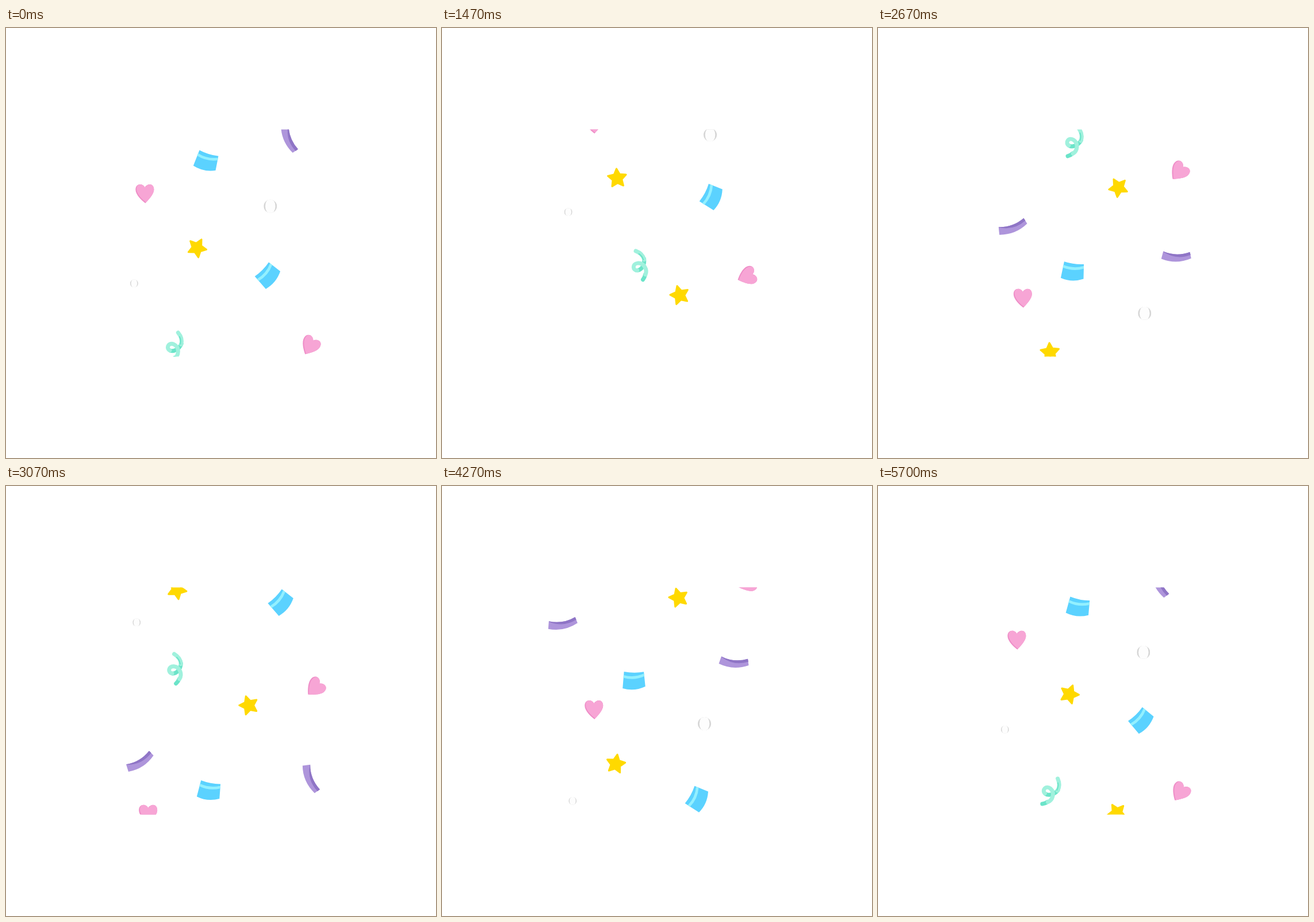
Write an HTML page with a canvas that moves like this. It is 748 px wide and 748 px high and loops after 5.73 s.

```html
<!DOCTYPE html>
<html lang="en">
<head>
<meta charset="utf-8">
<title>Falling confetti</title>
<style>
  html, body { margin: 0; width: 100%; height: 100%; overflow: hidden; background: #fff; }
  canvas { display: block; width: 748px; height: 748px; }
</style>
</head>
<body>
<canvas id="stage" width="748" height="748"></canvas>
<script>
const ctx = document.getElementById('stage').getContext('2d');
const LOOP = 5730, STEPS = 24;
const TOP = 176.5, SIZE = 395, MARGIN = 45;

function fill(path, color) {
  ctx.fillStyle = color;
  ctx.fill(new Path2D(path));
}

function stroke(path, color) {
  ctx.strokeStyle = color;
  ctx.stroke(new Path2D(path));
}

function heart() {
  const shape = new Path2D('M0-11C-3-18-16-19-16-7C-16 2-5 12 1 16.5C6 11 16 1 16-7C16-19 4-18 0-11Z');
  ctx.fillStyle = '#ee8dc7';
  ctx.fill(shape);
  ctx.clip(shape);
  ctx.translate(1.8, -1);
  ctx.fillStyle = '#f7a5d5';
  ctx.fill(shape);
}

function star() {
  ctx.beginPath();
  for (let i = 0; i < 10; i++) {
    const r = i % 2 ? 8.3 : 16.6, a = i * Math.PI / 5;
    ctx.lineTo(r * Math.cos(a), r * Math.sin(a));
  }
  ctx.closePath();
  ctx.fillStyle = ctx.strokeStyle = '#ffd900';
  ctx.lineWidth = 3;
  ctx.lineJoin = 'round';
  ctx.fill();
  ctx.stroke();
}

const ball = r => () => {
  ctx.beginPath();
  ctx.arc(0, 0, r, 0, 7);
  ctx.clip();
  ctx.fillStyle = '#d5d5d5';
  ctx.fillRect(-r, -r, 2 * r, 2 * r);
  ctx.beginPath();
  ctx.ellipse(0, 0, r * 0.77, r * 1.13, 0, 0, 7);
  ctx.fillStyle = '#fdfdfd';
  ctx.fill();
};

function patch() {
  fill('M-16.5-15Q1-11.5 18-14.5L20.5 11Q1 20-19 14Z', '#5bd2ff');
  fill('M-17.3-9Q1-4 18.3-11.5L18.8-6.8Q1 1-17.8-4.5Z', '#93f0ff');
}

function strip() {
  fill('M-26 7Q0 17.3 26 6L23.7-5Q0 3.5-22.6-6Z', '#ae95db');
  fill('M-22.6-6Q0 3.5 23.7-5L25 0Q0 9.5-22-5Z', '#8f75c6');
}

function curl() {
  const light = '#a0f1dd', dark = '#6be4c9';
  ctx.lineWidth = 7;
  ctx.lineCap = 'round';
  stroke('M9-10C9 0 3 8-4 8.5', dark);
  stroke('M8 17Q6.5 22 3 25.5', dark);
  stroke('M-4-25.5C3-22 8-17 9-9', light);
  stroke('M-5 8.5C-13 8-13-4-3-4C8-4 13 9 8.5 17', light);
  ctx.lineWidth = 2;
  stroke('M1-20Q6-16 7.5-9', dark);
}

// Motion rules: p counts steps, angles are in degrees
const fall = (enter, speed) => p => TOP + speed * (p - enter);
const line = (mid, at, rate) => p => mid + rate * (p - at);
const wave = (mid, amp, peak, period, drift = 0) => p =>
  mid + drift * (p - peak) + amp * Math.cos(2 * Math.PI * (p - peak) / period);
const still = () => 0;

// Each piece: shape, y, x, angle
const pieces = [
  [heart, fall(18.47, 20.2), wave(253, 12, 17.3, 12.4), still],
  [heart, fall(5.36, 20.2), wave(530, 7.5, 14.7, 13), wave(52, 19.5, 17.7, 13)],
  [star, fall(13.8, 20.2), wave(314, 19, 23.3, 16), wave(-5, 19, 25.4, 13)],
  [star, fall(4.14, 20.8), wave(417.5, 6, 12.5, 15), wave(32.5, 8.5, 16.3, 13)],
  [ball(11.5), fall(17.55, 20.7), wave(461.3, 5.6, 19, 17), still],
  [ball(7), fall(11.06, 20.7), wave(222.8, 5.2, 12.7, 15), still],
  [patch, fall(21.42, 21.3), wave(338.8, 9.4, 23.4, 14, 0.35), wave(7.5, 12, 25.2, 10.5)],
  [patch, fall(12.86, 22.8), line(455, 24, -2.27), wave(-54, 9, 13.2, 10)],
  [curl, fall(8.03, 23.7), wave(319.5, 27, 18.8, 11), wave(13, 34, 21.8, 11)],
  [strip, fall(23.37, 22.65), line(494.5, 24, 2.7), wave(28, 40, 23.9, 14.5)],
  [strip, fall(2.73, 26.7), wave(218.5, 24.5, 12, 15.5, -2), wave(-23.5, 20, 17.5, 11)]
];

function draw(step) {
  ctx.fillStyle = '#fff';
  ctx.fillRect(0, 0, 748, 748);
  ctx.save();
  ctx.beginPath();
  ctx.rect(TOP, TOP, SIZE, SIZE);
  ctx.clip();
  for (const [shape, y, x, angle] of pieces) {
    for (const p of [step, step + STEPS]) {
      if (y(p) < TOP - MARGIN || y(p) > TOP + SIZE + MARGIN) continue;
      ctx.save();
      ctx.translate(x(p), y(p));
      ctx.rotate(angle(p) * Math.PI / 180);
      shape();
      ctx.restore();
    }
  }
  ctx.restore();
}

// Poses change at 12.5 per second, shown on a 30 per second clock
function tick() {
  const t = performance.now() % LOOP;
  const clock = Math.floor((t + 5) * 0.03);
  draw(Math.floor(clock / 2.4 + 1e-6) % STEPS);
  requestAnimationFrame(tick);
}
tick();
</script>
</body>
</html>
```
